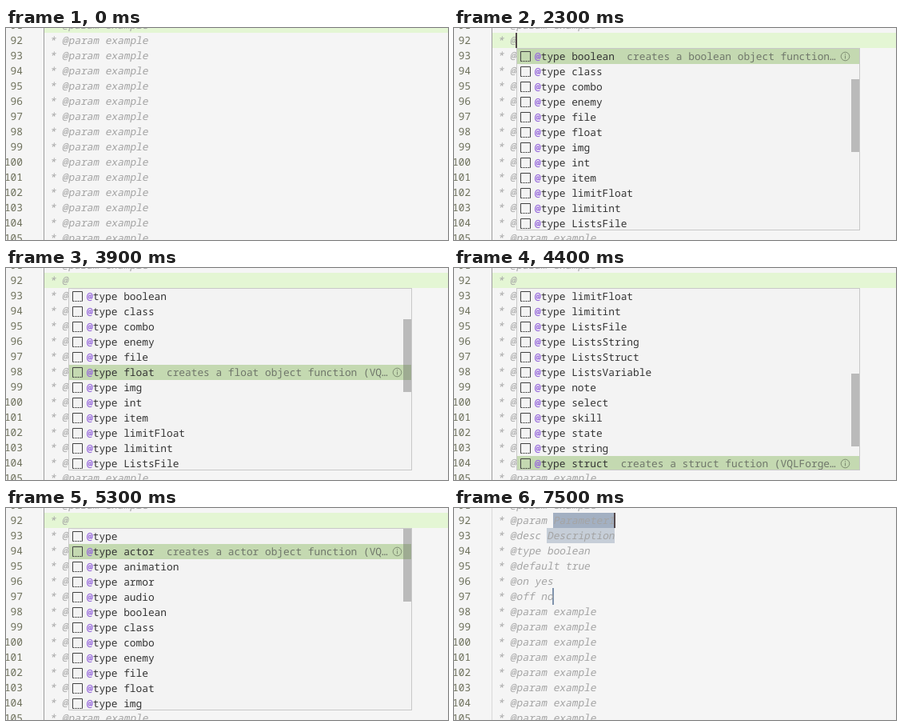
Recreate the animation shown at these times as an HTML page. Size 553 by 265 pixels, loop 8000 ms.

```html
<!DOCTYPE html>
<html lang="en">
<head>
<meta charset="utf-8">
<title>Editor snippet completion</title>
<style>
  html, body { margin: 0; width: 100%; height: 100%; overflow: hidden; background: #f5f5f5; }
  #stage {
    position: relative; width: 553px; height: 265px; overflow: hidden;
    background: #f5f5f5; color: #333;
    font: 12.828px/18px "Noto Sans Mono", "DejaVu Sans Mono", monospace;
    text-rendering: geometricPrecision; white-space: pre;
  }
  #stage div, #stage svg { position: absolute; }
  .num { left: -20px; width: 41px; text-align: right; color: #6d705b; }
  .code { left: 47px; color: #a4a4a4; transform: skewX(-11deg); transform-origin: 0 14px; }
  .code.raw { color: #600; transform: none; }
  #current { left: 48px; width: 505px; height: 19px; background: #e4f6d4; }
  #guide { left: 47px; top: 0; width: 1px; height: 265px; background: #9e9e9e; }
  .done #guide { background: #d9d9d9; }
  .done #current { display: none; }
  .caret { width: 2px; height: 19px; margin-left: -1px; background: #54494b; }
  .stop { height: 19px; background: #c6ced8; }
  .stop.active { background: #a3b0c2; }
  .stop.end { width: 2px; height: 21px; margin: -1px; background: #7f93ac; }
  #popup {
    top: 25px; width: 430px; box-sizing: border-box; overflow: hidden;
    border: 1px solid #c8c8c8; background: #f3f3f3;
  }
  .item { left: 0; width: 428px; height: 19px; }
  .item.on { background: #c4d9b1; }
  .label { left: 22px; width: 380px; overflow: hidden; text-overflow: ellipsis; color: #6f766a; }
  .label span { color: #333; }
  .label b { color: #9769dc; }
  .icon { left: 4px; top: 3px; }
  .info { left: 404px; top: 3px; }
  #bar { right: 0; width: 10px; height: 91px; background: rgba(100, 100, 100, .4); }
</style>
</head>
<body>
<div id="stage"></div>
<script>
const LOOP = 8000, ROW = 19, CHAR = 7.697, LEFT = 47, VISIBLE = 12;
const stage = document.getElementById('stage');
const sample = ' * @param example';
const snippet = [' * @param Parameter1', ' * @desc Description', ' * @type boolean',
  ' * @default true', ' * @on yes', ' * @off no'];

const types = ('actor animation armor audio boolean class combo enemy file float img int item ' +
  'limitFloat limitint ListsFile ListsString ListsStruct ListsVariable note select skill ' +
  'state string struct troop variable weapon').split(' ');
const all = ['@type', ...types.map(t => '@type ' + t), '@value'];
const lists = {
  '@': all,
  '@b': ['boolean', 'combo', 'variable', 'ListsVariable'].map(t => '@type ' + t),
  '@bo': ['boolean', 'combo'].map(t => '@type ' + t)
};

// Each step changes part of the editor state from its time on.
const steps = [
  [0, { row: 0, caret: 0, text: sample, raw: 0, query: '', sel: 0, bar: 0, done: 0 }],
  [100, { caret: 1 }], [600, { caret: 0 }], [1000, { caret: 1 }],
  [1400, { row: 1, text: ' * ', raw: 1 }],
  [1800, { text: ' * @' }], [1900, { raw: 0 }],
  [2200, { query: '@', sel: 5 }], [2300, { bar: 1 }], [2400, { caret: 0 }],
  [2800, { bar: 0 }], [3000, { caret: 1 }],
  [3300, { sel: 6 }], [3400, { bar: .5 }], [3500, { bar: 1, caret: 0 }],
  // Held arrow key: about three items per 100 ms
  ...Array.from({ length: 7 }, (_, i) => [3800 + 100 * i, { sel: 7 + 3 * i }]),
  [4000, { caret: 1 }], [4400, { caret: 0 }],
  [4600, { sel: 26 }], [4700, { sel: 27, caret: 1 }], [4900, { sel: 28 }], [5000, { sel: 29 }],
  [5100, { sel: 0, caret: 0 }], [5300, { sel: 1 }],
  [5700, { caret: 1 }], [6000, { bar: 0 }], [6200, { caret: 0 }], [6400, { caret: 1 }],
  [6700, { text: ' * @b', query: '@b', sel: 0 }],
  [7000, { text: ' * @bo' }], [7100, { query: '@bo' }],
  [7500, { query: '', done: 1 }]
].sort((a, b) => a[0] - b[0]);

const lineTop = row => row * ROW - 13;
const column = n => Math.round(LEFT + n * CHAR);
const box = (cls, style, html = '', id = '') =>
  `<div id="${id}" class="${cls}" style="${style}">${html}</div>`;
const caretAt = (row, n) => box('caret', `left:${column(n)}px;top:${lineTop(row)}px`);

const icon = `<svg class="icon" width="14" height="14" fill="none" stroke="#424242">
  <path d="M.5 12.5V.5H12.5V12.5"/><path d="M.5 12.5H13" stroke-dasharray="2 1"/></svg>`;
const info = `<svg class="info" width="13" height="13" fill="none" stroke="#7c8a70">
  <circle cx="6.5" cy="6.5" r="5.3"/><path d="M6.5 5.5V9.5M6.5 3.2V4.4"/></svg>`;

function describe(label) {
  if (label === '@value') return 'create a option with value fuction (VQLForge MV)';
  const name = label.split(' ')[1] || 'type';
  const kind = name === 'struct' ? 'fuction' : 'object function';
  return `creates a ${name} ${kind} (VQLForge MV)`;
}

// Bold the letters of the label that the query matches.
function mark(label, query) {
  let i = 0;
  return [...label].map(c => c === query[i] ? (i++, `<b>${c}</b>`) : c).join('');
}

function popup(s) {
  const list = lists[s.query];
  const top = s.sel < 5 ? 0 : Math.max(5, s.sel - VISIBLE + 1);
  const shown = list.slice(top, top + VISIBLE);
  const rows = shown.map((label, i) => {
    const on = top + i === s.sel;
    const text = `<span>${mark(label, s.query)}</span>` + (on ? '  ' + describe(label) : '');
    return box(on ? 'item on' : 'item', `top:${i * ROW}px`,
      icon + box('label', '', text) + (on ? info : ''));
  }).join('');
  const barTop = top / all.length * VISIBLE * ROW;
  const bar = s.bar ? box('', `top:${Math.round(barTop)}px;opacity:${s.bar}`, '', 'bar') : '';
  const left = column(3 + s.query.length);
  return box('', `left:${left}px;height:${shown.length * ROW}px`, rows + bar, 'popup');
}

function tabStops() {
  const stop = (cls, row, from, n) => box('stop ' + cls,
    `left:${column(from)}px;top:${lineTop(row)}px;` + (n ? `width:${n * CHAR}px` : ''));
  return stop('active', 1, 10, 10) + stop('', 2, 9, 11) + stop('end', 6, 10);
}

function draw(s) {
  let html = box('', `top:${lineTop(s.row)}px`, '', 'current') + box('', '', '', 'guide');
  if (s.done) html += tabStops();
  for (let row = 0; row < 15; row++) {
    const y = `top:${lineTop(row)}px`;
    let text = row === 1 ? s.text : sample;
    if (s.done && row > 0) text = snippet[row - 1] || sample;
    html += box('num', y, 91 + row);
    html += box(row === 1 && s.raw ? 'code raw' : 'code', y, text);
  }
  if (s.done) html += caretAt(1, snippet[0].length);
  else if (s.caret) html += caretAt(s.row, s.row ? s.text.length : sample.length);
  if (s.query) html += popup(s);
  stage.className = s.done ? 'done' : '';
  stage.innerHTML = html;
}

const start = performance.now();
let last = 0;
function frame() {
  const t = (performance.now() - start) % LOOP;
  const count = steps.filter(step => step[0] <= t).length;
  if (count !== last) {
    last = count;
    draw(Object.assign({}, ...steps.slice(0, count).map(step => step[1])));
  }
  requestAnimationFrame(frame);
}
frame();
</script>
</body>
</html>
```
